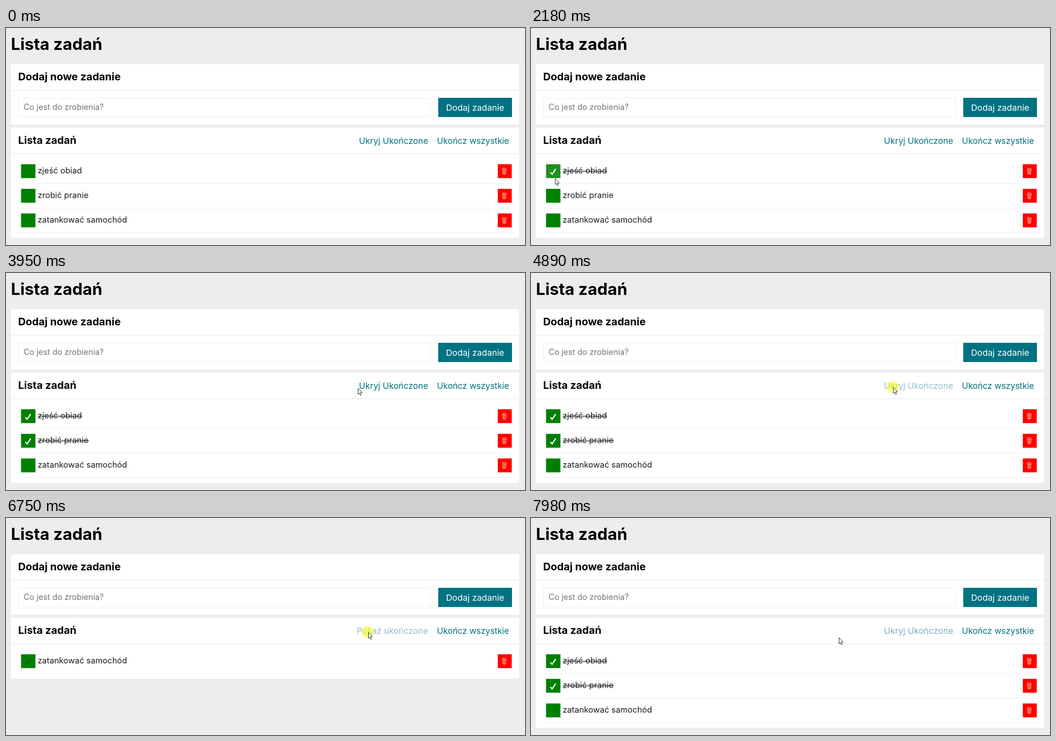
These frames come from a looping animation (1155x485 px, 8000 ms). An HTML page with a canvas:

```html
<!DOCTYPE html>
<html lang="pl">
<head>
<meta charset="utf-8">
<title>Lista zadań</title>
<style>
html, body { margin: 0; width: 100%; height: 100%; overflow: hidden; background: #ededef; }
canvas { display: block; }
</style>
</head>
<body>
<canvas id="stage" width="1155" height="485"></canvas>
<script>
const ctx = document.getElementById('stage').getContext('2d');
const LOOP = 8000;
const TEAL = '#007282';
const GREY = '#ededef';
const INK = '#1c1c1c';
const ROW_TOP = 304, ROW_STEP = 55;
const PANEL_LEFT = 11, PANEL_WIDTH = 1131;
const TASKS = ['zjeść obiad', 'zrobić pranie', 'zatankować samochód'];

// Moments at which each click takes effect; a highlight shows shortly before.
const DONE_FIRST = 1770, DONE_SECOND = 2790, HIDE = 5090, SHOW = 6890;
const CLICKS = [DONE_FIRST, DONE_SECOND, HIDE, SHOW];
const HIGHLIGHT = 200;

const ENTER = 730;
const MOVES = [
  { from: ENTER, to: 1450, x: 53, y: 328 },
  { from: 2050, to: 2500, x: 55, y: 367 },
  { from: 2950, to: 3950, x: 783, y: 257 },
  { from: 4000, to: 4400, x: 806, y: 255 },
  { from: 7600, to: 7980, x: 685, y: 267 }
];

const mix = (a, b, k) => a + (b - a) * k;

function ease(t, start, length) {
  const k = Math.max(0, Math.min(1, (t - start) / length));
  return k * k * (3 - 2 * k);
}

function pointerAt(t) {
  let x = 358, y = 480;
  for (const move of MOVES) {
    const k = ease(t, move.from, move.to - move.from);
    x = mix(x, move.x, k);
    y = mix(y, move.y, k);
  }
  return { x, y };
}

// A click redraws the hovered control, so its fade starts again.
function hover(t, enter, leave, fade, redraws) {
  const start = Math.max(enter, ...redraws.filter(moment => moment <= t));
  return ease(t, start, fade) * (1 - ease(t, leave, fade));
}

function rect(x, y, w, h, color) {
  ctx.fillStyle = color;
  ctx.fillRect(x, y, w, h);
}

// Buttons have half-pixel soft edges.
function button(x, y, w, h, color) {
  rect(x + 0.5, y + 0.5, w - 1, h - 1, color);
}

function text(str, x, y, size, color = '#000', weight = 400, align = 'left') {
  ctx.font = `${weight} ${size}px Inter, "Open Sans", sans-serif`;
  ctx.textAlign = align;
  ctx.fillStyle = color;
  ctx.fillText(str, x, y);
}

function panel(top, height, title) {
  rect(PANEL_LEFT, top, PANEL_WIDTH, height, '#fff');
  rect(PANEL_LEFT, top + 57.5, PANEL_WIDTH, 1.5, GREY);
  text(title, 27, top + 36, 23.3, '#000', 700);
}

function checkMark(x, y, color) {
  ctx.strokeStyle = color;
  ctx.lineWidth = 2.6;
  ctx.beginPath();
  ctx.moveTo(x - 6, y + 1.5);
  ctx.lineTo(x - 2, y + 6);
  ctx.lineTo(x + 6, y - 6);
  ctx.stroke();
}

function bin(x, y) {
  ctx.strokeStyle = '#f5dfae';
  ctx.lineWidth = 1;
  ctx.beginPath();
  ctx.ellipse(x, y - 5, 4.4, 1.7, 0.1, 0, 2 * Math.PI);
  for (const side of [-1, 1]) {
    for (const spread of [1.3, 4]) {
      ctx.moveTo(x + side * spread, y - 4);
      ctx.lineTo(x + side * spread * 0.75, y + 6);
    }
  }
  ctx.moveTo(x - 3, y + 6);
  ctx.quadraticCurveTo(x, y + 8, x + 3, y + 6);
  ctx.stroke();
}

function form() {
  panel(81, 135, 'Dodaj nowe zadanie');
  ctx.strokeStyle = '#ebebed';
  ctx.lineWidth = 1;
  ctx.strokeRect(27.5, 156.5, 917, 42);
  text('Co jest do zrobienia?', 39, 183, 18, '#757575');
  button(961.5, 155.5, 165, 44, TEAL);
  text('Dodaj zadanie', 1044, 185, 19.3, '#fff', 400, 'center');
}

function taskRow(index, label, done, lit) {
  const y = ROW_TOP + index * ROW_STEP;
  const tint = 34 * lit;
  button(33, y, 33, 32, `rgb(${tint}, ${128 + tint / 2}, ${tint})`);
  text(label, 70.5, y + 21, 18.3, INK);
  if (done) {
    checkMark(49, y + 17, '#fff');
    rect(71, y + 15.5, ctx.measureText(label).width, 1.4, INK);
  }
  button(1094, y, 32, 32, '#f00');
  bin(1109, y + 16);
  rect(23, y + 43, 1109, 1, GREY);
}

function list(t) {
  const hidden = t >= HIDE && t < SHOW;
  const rows = hidden ? 1 : TASKS.length;
  if (hidden) rect(PANEL_LEFT, 359, PANEL_WIDTH, 110, '#ececec');
  panel(222.5, 81.5 + rows * ROW_STEP, 'Lista zadań');

  ctx.globalAlpha = 1 - 0.56 * hover(t, 4020, 7740, 880, [HIDE, SHOW]);
  text(hidden ? 'Pokaż ukończone' : 'Ukryj Ukończone', 939.5, 259, 19, TEAL, 400, 'right');
  ctx.globalAlpha = 1;
  text('Ukończ wszystkie', 1119.5, 259, 18.8, TEAL, 400, 'right');

  if (hidden) {
    taskRow(0, TASKS[2], false, 0);
    checkMark(49, ROW_TOP + 17, '#145a28');
    return;
  }
  taskRow(0, TASKS[0], t >= DONE_FIRST, hover(t, 1200, 2130, 300, [DONE_FIRST]));
  taskRow(1, TASKS[1], t >= DONE_SECOND, hover(t, 2350, 3050, 300, [DONE_SECOND]));
  taskRow(2, TASKS[2], false, 0);
}

function pointer(t) {
  if (t < ENTER) return;
  const { x, y } = pointerAt(t);
  if (CLICKS.some(click => t >= click - HIGHLIGHT && t < click)) {
    ctx.fillStyle = 'rgba(255, 253, 0, 0.52)';
    ctx.beginPath();
    ctx.arc(x - 1, y, 13, 0, 2 * Math.PI);
    ctx.fill();
  }
  const arrow = new Path2D('M.5 .5V14l2.9-2.7 2 4.9 2.2-.9-2-4.7 4-.3Z');
  ctx.save();
  ctx.translate(x, y);
  ctx.fillStyle = '#fff';
  ctx.fill(arrow);
  ctx.strokeStyle = '#111';
  ctx.lineWidth = 1;
  ctx.stroke(arrow);
  ctx.restore();
}

function draw(t) {
  rect(0, 0, 1155, 485, GREY);
  text('Lista zadań', 11, 49, 36.5, '#000', 700);
  form();
  list(t);
  pointer(t);
}

const start = performance.now();
function tick() {
  draw((performance.now() - start) % LOOP);
  requestAnimationFrame(tick);
}
tick();
</script>
</body>
</html>
```
